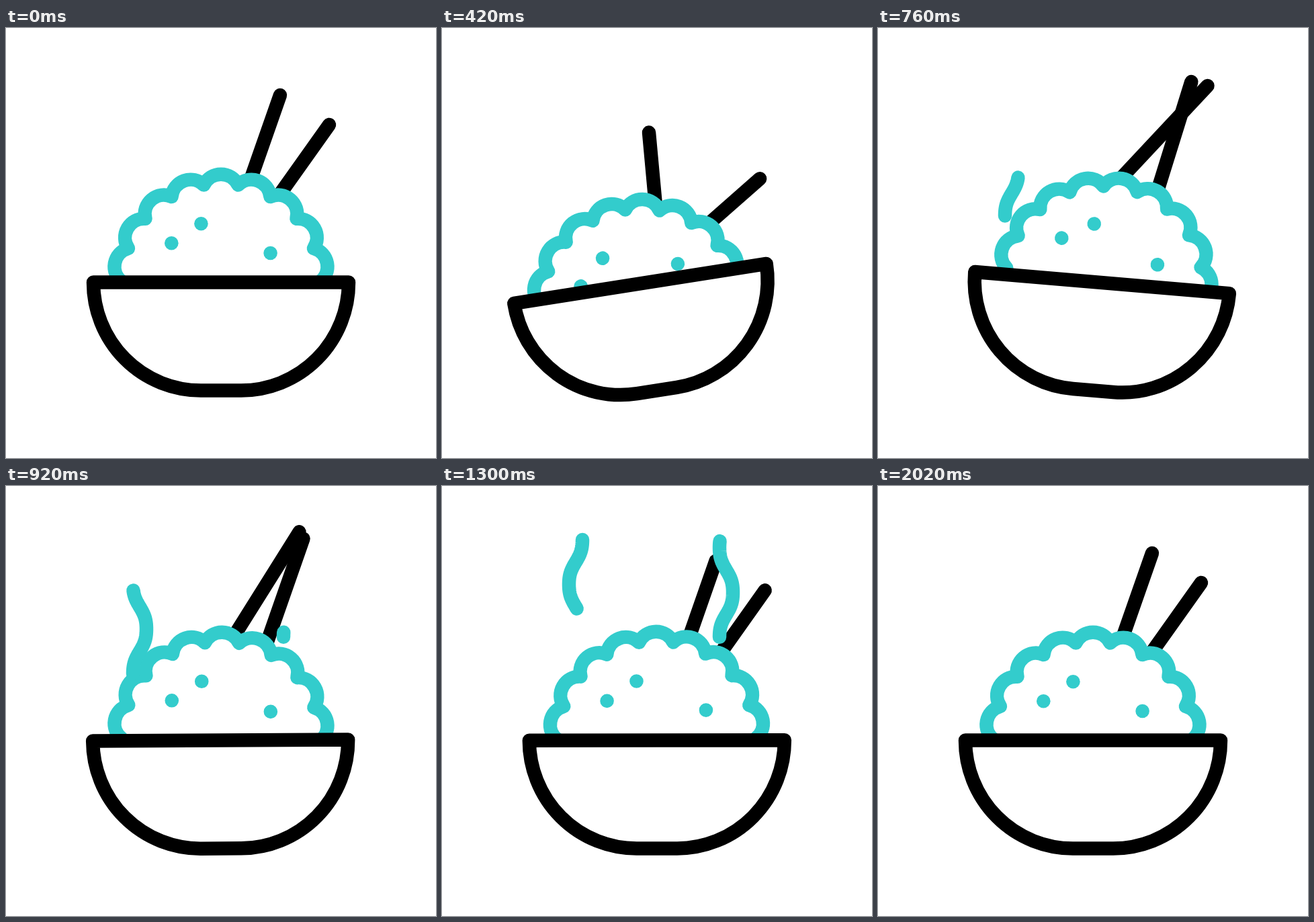
Animation, 640 px wide and 640 px high, one loop 2400 ms. Source, as an HTML page with a canvas:

```html
<!DOCTYPE html>
<html lang="en">
<head>
<meta charset="utf-8">
<title>Rice bowl</title>
<style>
html, body { margin: 0; width: 100%; height: 100%; overflow: hidden; background: #fff; }
canvas { display: block; width: 640px; height: 640px; }
</style>
</head>
<body>
<canvas id="stage" width="640" height="640"></canvas>
<script>
const ctx = document.getElementById('stage').getContext('2d');
const LOOP = 2400, TEAL = '#33cccc', BLACK = '#000', WHITE = '#fff';
const RAD = Math.PI / 180;

// Turning points in ms: rocking of bowl and rice, bouncing, swing of the sticks.
const ROCK = [22, 360, 735, 1040, 1325];
const BOUNCE = [20, 393, 845, 1130, 1420];
const SWING = [0, 375, 765, 1185];

const bowl = new Path2D('M130 378.5H510A160 161 0 0 1 350 539.5H290A160 161 0 0 1 130 378.5Z');
const rice = makeRice();

// Nine equal bumps, each turned 20 degrees from the one before.
function makeRice() {
  let x = 173.1, y = 378.2, path = `M${x} ${y}`;
  for (let deg = 80; deg >= -80; deg -= 20) {
    x += 51 * Math.cos(deg * RAD);
    y -= 51 * Math.sin(deg * RAD);
    path += `A28.4 28.4 0 0 1 ${x} ${y}`;
  }
  return new Path2D(path);
}

function ease(t, from, to) {
  const s = Math.min(1, Math.max(0, (t - from) / (to - from)));
  return s * s * (3 - 2 * s);
}

// Eases from rest through each peak in turn and back to rest.
function sway(t, beats, ...peaks) {
  const stops = [0, ...peaks, 0];
  return beats.slice(1).reduce(
    (v, beat, i) => v + (stops[i + 1] - stops[i]) * ease(t, beats[i], beat), 0);
}

function turn(x, y, deg) {
  ctx.translate(x, y);
  ctx.rotate(deg * RAD);
  ctx.translate(-x, -y);
}

function outline(path, color) {
  ctx.fillStyle = WHITE;
  ctx.strokeStyle = color;
  ctx.fill(path);
  ctx.stroke(path);
}

function dot(x, y) {
  ctx.fillStyle = TEAL;
  ctx.beginPath();
  ctx.arc(x, y, 10.3, 0, 2 * Math.PI);
  ctx.fill();
}

function drawStick(t, x, y, length, deg) {
  ctx.save();
  ctx.translate(x, y + sway(t, BOUNCE, 68, -62.5, 31.5));
  ctx.rotate(deg * RAD);
  ctx.strokeStyle = BLACK;
  ctx.beginPath();
  ctx.moveTo(0, -length);
  ctx.lineTo(0, 60);
  ctx.stroke();
  ctx.restore();
}

// Follows the bowl's rocking a little late.
function drawRice(t) {
  ctx.save();
  ctx.translate(0, sway(t + 12, BOUNCE, 35.3, 0.8, -3));
  turn(320, 410, sway(t - 34, ROCK, -10, 5, -3));
  outline(rice, TEAL);
  dot(246.3, 320.3);
  dot(290.4, 291.2);
  dot(393.6, 335);
  ctx.restore();
}

// A rising line of three half waves; head and tail run from 0 to 1.
function drawSteam(x, top, head, tail) {
  if (head <= tail) return;
  const steps = 60;
  ctx.strokeStyle = TEAL;
  ctx.beginPath();
  for (let i = 0; i <= steps; i++) {
    const u = 1 - tail - (head - tail) * i / steps;
    const a = 3 * Math.PI * u;
    const wave = (Math.cos(a) - 0.06 * Math.cos(3 * a)) / 0.94;
    ctx.lineTo(x + 10 * wave, top + 199.5 * u);
  }
  ctx.stroke();
}

function draw(t) {
  ctx.fillStyle = WHITE;
  ctx.fillRect(0, 0, 640, 640);
  ctx.lineWidth = 20.5;
  ctx.lineCap = ctx.lineJoin = 'round';

  ctx.save();
  turn(320, 539.5, sway(t, ROCK, -10, 5, -3));
  drawStick(t, 358.1, 242.5, 151, 19.3 + sway(t, SWING, -17, 19));
  drawStick(t, 395.3, 264.6, 148, 35.4 + sway(t, SWING, 24, -23));
  drawRice(t);
  outline(bowl, BLACK);
  ctx.restore();

  drawSteam(199, 80, ease(t, 515, 1213), ease(t, 955, 1660));
  drawSteam(423, 25.3, ease(t, 841, 1551), ease(t, 1300, 2012));
}

const start = performance.now();
function tick() {
  draw((performance.now() - start) % LOOP);
  requestAnimationFrame(tick);
}
tick();
</script>
</body>
</html>
```
